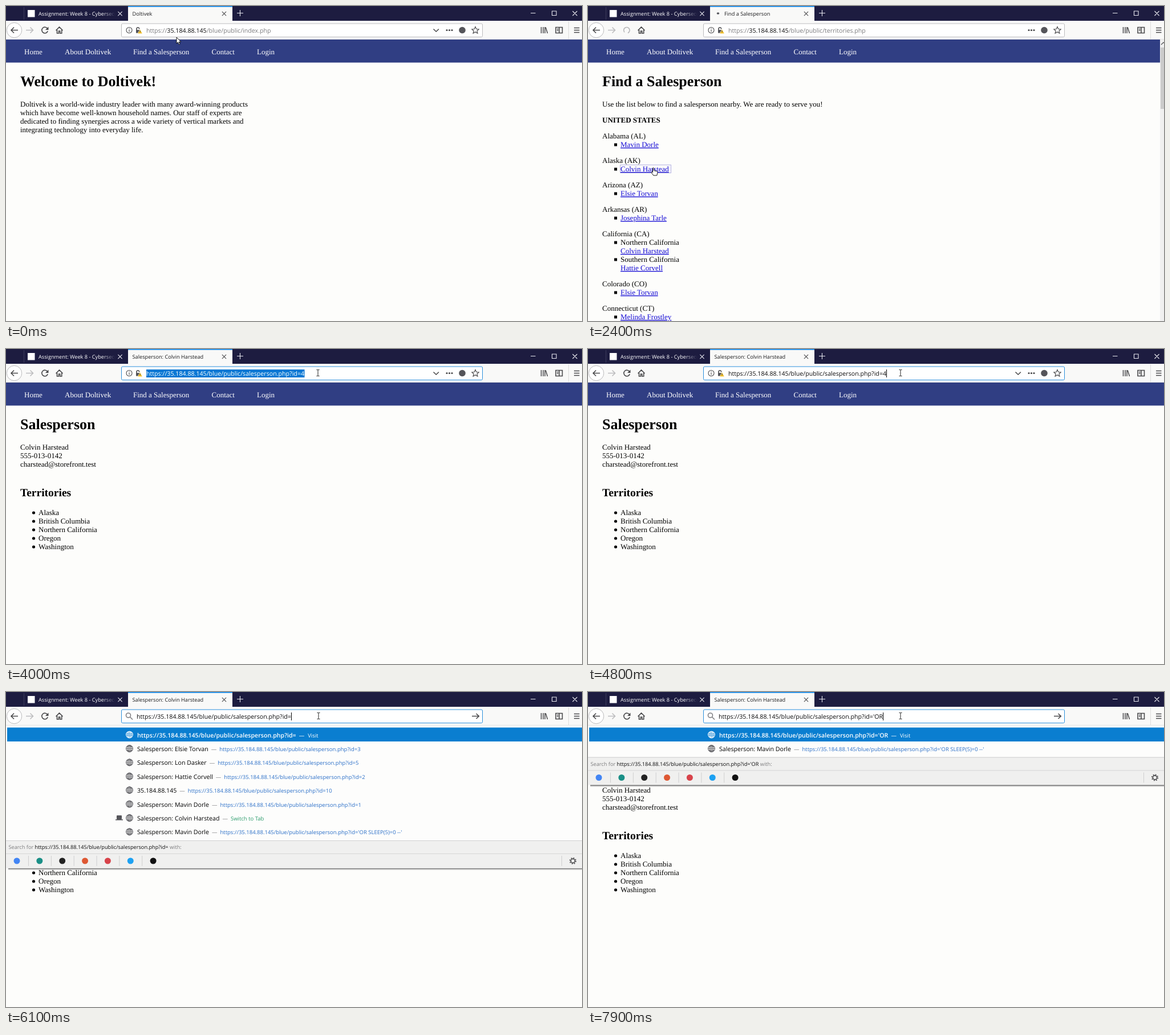
Animation, 1010 px wide and 554 px high, one loop 8 s. Source, as an HTML page:

```html
<!DOCTYPE html>
<html lang="en">
<head>
<meta charset="utf-8">
<title>Browser session</title>
<style>
  html, body { margin: 0; width: 100%; height: 100%; overflow: hidden; background: #fdfdfb; }
  svg { display: block; width: 1010px; height: 554px; }
  text { white-space: pre; }
  .page { font: 13px "Liberation Serif", serif; text-rendering: geometricPrecision; }
  .h1 { font-size: 26px; font-weight: bold; }
  .h2 { font-size: 19.5px; font-weight: bold; }
  .bold { font-weight: bold; }
  .link { fill: #1208d4; text-decoration: underline; }
  .ui { font: 9.2px "Open Sans", "Noto Sans", sans-serif; text-rendering: geometricPrecision; }
  .url { font-size: 10.65px; }
  .small { font-size: 9.5px; }
  .line { fill: none; stroke: #4a4a4c; stroke-width: 1.6; }
  .white { stroke: #e8e8ef; stroke-width: 1.1; }
  .thin { stroke-width: 1.1; }
</style>
</head>
<body>
<svg viewBox="0 0 1010 554" id="stage"></svg>
<script>
const LOOP = 8000, STEP = 100;
const BASE = "https://35.184.88.145/blue/public/";
const QUERY = BASE + "salesperson.php?id=";
const PEOPLE = {
  burke: "Mavin Dorle", main: "Colvin Harstead", irene: "Elsie Torvan", olson: "Josephina Tarle",
  sherry: "Hattie Corvell", barbara: "Melinda Frostley", ken: "Lon Dasker"
};
const COMPANY = "Doltivek";

const text = (x, y, body, cls = "", fill = "#000") =>
  `<text x="${x}" y="${y}" class="${cls}" fill="${fill}">${body}</text>`;
const link = (x, y, body) => `<text x="${x}" y="${y}" class="link">${body}</text>`;
const rect = (x, y, w, h, fill, more = "") =>
  `<rect x="${x}" y="${y}" width="${w}" height="${h}" fill="${fill}" ${more}/>`;
const line = (d, cls = "", more = "") => `<path d="${d}" class="line ${cls}" ${more}/>`;
const dot = (x, y, r, fill) => `<circle cx="${x}" cy="${y}" r="${r}" fill="${fill}"/>`;
const group = (id, body, more = "") => `<g id="${id}" ${more}>${body}</g>`;
const cross = (x, y, r, cls, more) =>
  line(`M${x - r} ${y - r}l${2 * r} ${2 * r}m0 ${-2 * r}l${-2 * r} ${2 * r}`, cls, more);
const globe = (y, color) => `<g transform="translate(216.5 ${y})" fill="none" stroke="${color}" stroke-width="1.1">
  <circle r="5.8"/><ellipse rx="2.7" ry="5.8"/><path d="M-5.8 0H5.8M-5 -3H5M-5 3H5M0 -5.8V5.8" stroke-width=".8"/></g>`;

function navBar() {
  const items = [[32, "Home"], [103, "About " + COMPANY], [223, "Find a Salesperson"], [360.5, "Contact"], [440, "Login"]];
  return rect(0, 59, 1010, 40.5, "#303e83") + items.map(([x, s]) => text(x, 85, s, "", "#fff")).join("");
}

function homePage() {
  const lines = [
    COMPANY + " is a world-wide industry leader with many award-winning products",
    "which have become well-known household names. Our staff of experts are",
    "dedicated to finding synergies across a wide variety of vertical markets and",
    "integrating technology into everyday life."
  ];
  return text(25, 141, `Welcome to ${COMPANY}!`, "h1") + lines.map((s, i) => text(25, 177 + 15 * i, s)).join("");
}

function listPage() {
  const square = y => rect(46, y - 6.5, 5, 5, "#000");
  const states = [
    [233, "Alabama (AL)", "burke"], [276, "Alaska (AK)", "main"], [319, "Arizona (AZ)", "irene"],
    [362, "Arkansas (AR)", "olson"], [493, "Colorado (CO)", "irene"], [536, "Connecticut (CT)", "barbara"]
  ];
  const regions = [[420, "Northern California", "main"], [450, "Southern California", "sherry"]];
  return text(25, 141, "Find a Salesperson", "h1")
    + text(25, 177, "Use the list below to find a salesperson nearby. We are ready to serve you!")
    + text(25, 205, "UNITED STATES", "bold")
    + states.map(([y, s, who]) => text(25, y, s) + square(y + 15) + link(57, y + 15, PEOPLE[who])).join("")
    + text(25, 405, "California (CA)")
    + regions.map(([y, s, who]) => square(y) + text(57, y, s) + link(57, y + 15, PEOPLE[who])).join("")
    + group("focus", rect(56.5, 279.5, 89, 14, "none", 'stroke="#6a66c8" stroke-dasharray="1 1"'))
    + rect(1003, 59, 7, 495, "#f0f0f0") + rect(1004, 73, 6, 108, "#cbcbcb")
    + line("M1005 68l4-4 4 4", "thin");
}

function personPage() {
  const lines = [PEOPLE.main, "555-013-0142", "charstead@storefront.test"];
  const places = ["Alaska", "British Columbia", "Northern California", "Oregon", "Washington"];
  return text(25, 141, "Salesperson", "h1")
    + lines.map((s, i) => text(25, 177 + 15 * i, s)).join("")
    + text(25, 259, "Territories", "h2")
    + places.map((s, i) => dot(48.5, 288 + 15 * i, 2.6, "#000") + text(57, 292 + 15 * i, s)).join("");
}

function tabStrip() {
  return rect(0, 0, 1010, 26, "#1d1c40")
    + line("M31.5 2V24", "", 'style="stroke:#3c3b5c;stroke-width:1"')
    + rect(38, 7, 12.5, 12.5, "#fff")
    + `<g mask="url(#fade)">${text(57, 17, "Assignment: Week 8 - Cybersecurity", "", "#fff")}</g>`
    + cross(200, 13.5, 3.6, "white")
    + rect(214, 0, 183, 26, "#f9f9f8")
    + `<g clip-path="url(#tab)"><circle id="burst" cx="228" cy="14" fill="#a9d3fb"/></g>`
    + rect(214, 0, 183, 1.6, "#0a84e8")
    + `<ellipse id="throbber" cy="13" rx="2.3" ry="1.8" fill="#55565c"/>`
    + text(221.5, 17, "", "title", "#1c1c1e").replace("<text", '<text id="title"')
    + cross(382.5, 13.5, 3.6, "thin")
    + line("M405 12.5h11M410.5 7v11", "white")
    + line("M920 12.5h8.5M957.5 9h7.5v7.5h-7.5zM993.5 9l8 8m0-8l-8 8", "white");
}

function toolbar() {
  const rest = line("M749.5 40.5l4.7 4.5 4.7-4.5", "", 'id="chevron"')
    + [773, 777.5, 782].map(x => dot(x, 42.5, 1.6, "#4a4a4c")).join("")
    + dot(800, 42.5, 5.8, "#55555a")
    + line("M823 36.5l1.8 4 4.3.4-3.2 2.9 1 4.2-3.9-2.2-3.9 2.2 1-4.2-3.2-2.9 4.3-.4z", "", 'style="stroke-width:1.2"')
    + `<circle cx="216" cy="42.5" r="5" class="line thin"/>` + line("M216 41.5v4M216 39v1.3", "thin")
    + rect(228, 42, 6.5, 5.5, "#55555a") + line("M229 42v-2.5a2.4 2.4 0 0 1 4.6 0v1")
    + `<path d="M235 41l4 7.5h-8z" fill="#f4c026" stroke="#f9f3df" stroke-width=".6"/>` + line("M235 43.5v2.6", "thin")
    + rect(246, 36, 277.5, 14, "#0a78d4", 'id="highlight"')
    + `<text x="246" y="47" class="url" id="address" fill="#7b7b7e"><tspan>https://</tspan><tspan id="host">35.184.88.145</tspan><tspan id="path"></tspan></text>`;
  const editing = `<circle cx="214.5" cy="41" r="4" class="line" style="stroke:#808084"/>`
    + line("M217.5 44l4.5 4.5", "", 'style="stroke:#808084"')
    + text(229, 47, "", "url", "#0c0c0d").replace("<text", '<text id="typed"')
    + line("M817 42.5h12M824.5 38l4.8 4.5-4.8 4.5");
  return rect(0, 26, 1010, 33, "#f9f9f8") + rect(0, 58, 1010, 1, "#e2e2e2")
    + `<circle cx="14.5" cy="42.5" r="13.2" fill="#fff" stroke="#b9b9bb"/>`
    + line("M21 42.5H9M14 37.5l-5 5 5 5")
    + line("M35 42.5h12M42.5 37.5l5 5-5 5", "", 'style="stroke:#bdbdbf"')
    + group("reload", line("M72.6 39.6A5.3 5.3 0 1 0 73.2 44") + `<path d="M74.5 36.5v5.5h-5.5z" fill="#4a4a4c"/>`)
    + group("spin", line("M64 46.2A5.2 5.2 0 1 1 70 47.4", "", 'style="stroke:#b6b6b8"'))
    + group("stop", cross(68, 42.5, 5, "", 'style="stroke:#a9a9ab"'))
    + line("M87.5 43l6-6 6 6M89.5 42v6h3v-4h2.2v4h3v-6")
    + rect(202.5, 31, 633, 23.5, "#fff", 'id="field" rx="2"')
    + group("resting", rest) + group("editing", editing)
    + `<path id="caret" d="M0 36v14" stroke="#000"/>`
    + line("M938.5 37v11M942 37v11M945 37v11M946.3 37.5l3.2 10.5", "", 'style="stroke-width:1.5"')
    + line("M964 37.5h11.5v10h-11.5zM970 37.5v10M966 40.5h2.5M966 43h2.5")
    + rect(986, 27, 1, 31, "#dcdcdc")
    + line("M996 38.5h9.5M996 42.5h9.5M996 46.5h9.5");
}

function suggestion(i, title, note, color = "#2c70c8") {
  const y = 75.5 + 24.4 * i;
  return globe(y - .5, "#55555a")
    + `<text x="230" y="${y + 4}" class="url">${title}<tspan dx="5" class="small" fill="#8a8a8c">—</tspan><tspan dx="5" class="small" fill="${color}">${note}</tspan></text>`;
}

function dropdown() {
  const person = (i, who, id) => suggestion(i, "Salesperson: " + PEOPLE[who], QUERY + id);
  const injected = "'OR SLEEP(5)=0 --'";
  const all = person(1, "irene", 3) + person(2, "ken", 5) + person(3, "sherry", 2)
    + suggestion(4, "35.184.88.145", QUERY + 10) + person(5, "burke", 1)
    + suggestion(6, "Salesperson: " + PEOPLE.main, "Switch to Tab", "#2c9c6c")
    + rect(194, 217, 9, 7, "#55555a", 'rx="1"') + rect(192, 224, 13, 1.5, "#55555a")
    + person(7, "burke", injected);
  const engines = ["#4285f4", "#1a8f86", "#222222", "#de5833", "#d8434a", "#1da1f2", "#111111"];
  const footer = rect(0, 0, 1010, 49, "#f0f0ef") + rect(0, 0, 1010, 1, "#d0d0d0") + rect(0, 23, 1010, 1, "#d6d6d6")
    + rect(4, 49, 1006, 1.5, "#777") + rect(4, 50.5, 1006, 1.5, "#ccc")
    + `<text x="4.5" y="15" fill="#7c7c7e">Search for <tspan id="search" fill="#0c0c0d"></tspan> with:</text>`
    + engines.map((c, i) => dot(19 + 39.85 * i, 36, 5.5, c)
      + (i < 6 ? rect(39 + 39.85 * i, 27, 1, 18, "#cfcfd0") : "")).join("")
    + rect(974, 27, 1, 18, "#cfcfd0")
    + `<g class="line" transform="translate(994 36)"><circle r="3.6"/><circle r="5.3" stroke-dasharray="2 2.163"/></g>`;
  return rect(0, 59, 1010, 1, "#fdfdfc", 'id="sheet"')
    + `<g clip-path="url(#rows)">` + rect(2, 62.5, 1008, 24.5, "#0a7ed0") + globe(75, "#fff")
    + `<text x="230" y="79.5" class="url" fill="#fff"><tspan id="visit" font-weight="600"></tspan><tspan dx="5" class="small">—</tspan><tspan dx="6" class="small">Visit</tspan></text>`
    + group("all", all) + group("few", person(1, "burke", injected)) + "</g>"
    + group("footer", footer);
}

// Each pointer's origin is its hot spot.
const POINTERS = {
  arrow: '<path d="M0 0v11l2.5-2.3 1.9 4 1.8-.8-1.9-3.9h3.5z" fill="#fff" stroke="#000" stroke-width=".9"/>',
  hand: '<path d="M-1 .5c0-1.4 2-1.4 2 0v4l5 1.1c1.5.4 1.7 1.4 1.3 3l-1 4.4h-6l-3.6-5c-.6-1.2.8-1.9 1.6-1l.7.8z" fill="#fff" stroke="#000" stroke-width=".9"/>',
  beam: '<path d="M-2.5-5.5H-.5L0-5l.5-.5h2M0-5V5M-2.5 5.5H-.5L0 5l.5.5h2" fill="none" stroke="#222"/>'
};

document.getElementById("stage").innerHTML = `<defs>
  <linearGradient id="ramp"><stop offset=".84" stop-color="#fff"/><stop offset="1" stop-color="#000"/></linearGradient>
  <mask id="fade" maskUnits="userSpaceOnUse" x="50" y="0" width="142" height="26">${rect(50, 0, 142, 26, "url(#ramp)")}</mask>
  <clipPath id="tab">${rect(214, 0, 183, 26, "#000")}</clipPath>
  <clipPath id="rows">${rect(0, 59, 1010, 1, "#000", 'id="rowClip"')}</clipPath></defs>`
  + rect(0, 0, 1010, 554, "#fdfdfb")
  + group("pages", navBar() + group("home", homePage()) + group("list", listPage()) + group("person", personPage()), 'class="page"')
  + group("chrome", tabStrip() + toolbar() + group("dropdown", dropdown()), 'class="ui"')
  + Object.entries(POINTERS).map(([id, body]) => group(id, body)).join("");

const el = {};
document.querySelectorAll("#stage [id]").forEach(node => el[node.id] = node);
const show = (id, on) => { el[id].style.display = on ? "" : "none"; };
const set = (id, attrs) => { for (const k in attrs) el[id].setAttribute(k, attrs[k]); };
const write = (id, s) => { if (el[id].textContent !== s) el[id].textContent = s; };
const within = (t, a, b) => t >= a && t < b;

// Last entry of [time, value] pairs already reached.
const latest = (t, keys) => keys.filter(k => k[0] <= t).pop();

const PATH = [[0, 299, 55], [100, 299, 55], [600, 285.5, 87.5], [1300, 285.5, 87.5], [2000, 114.5, 285],
  [2900, 114.5, 285], [3600, 547, 42], [4100, 547, 42], [4500, 548, 42], [LOOP, 548, 42]];
const SHAPES = [[0, "arrow"], [400, "hand"], [1400, "arrow"], [2000, "hand"], [2900, "arrow"], [3600, "beam"]];
const PAGES = [[0, "home", COMPANY, "index.php"],
  [1000, "list", "Find a Salesperson", "territories.php"],
  [2800, "person", "Salesperson: " + PEOPLE.main, "salesperson.php?id=4"]];
const KEYS = [[0, ""], [5000, ""], [6700, "'"], [7300, "'O"], [7600, "'OR"]];
const SHEET = [[0, 180], [5100, 224], [5200, 252], [5300, 261], [6800, 114.5]];

function pointerAt(t) {
  const i = PATH.findIndex(p => p[0] > t);
  const [t0, x0, y0] = PATH[i - 1], [t1, x1, y1] = PATH[i];
  const u = (t - t0) / (t1 - t0), e = u * u * (3 - 2 * u);
  return `translate(${x0 + (x1 - x0) * e} ${y0 + (y1 - y0) * e})`;
}

function drawPage(t) {
  const [since, page, title, file] = latest(t, PAGES);
  for (const [, id] of PAGES) show(id, id === page);
  show("focus", t >= 2200);

  const loading = within(t, 700, 1000) || within(t, 2300, 2800);
  write("title", title);
  set("title", { x: loading ? 239 : 221.5 });
  show("throbber", loading);
  set("throbber", { cx: 228 + 5 * Math.sin((t - 2400) / 160) });

  const age = t - since, bursting = since > 0 && age < 400;
  show("burst", bursting);
  if (bursting) set("burst", { r: 20 + 30 * (age / 100) ** 1.5, opacity: Math.min(1, 1.3 - age / 330) });

  const spinning = within(t, 700, 900) || within(t, 2300, 2500);
  const stopping = within(t, 900, 1400) || within(t, 2500, 3200);
  show("spin", spinning);
  show("stop", stopping);
  show("reload", !spinning && !stopping);
  write("path", "/blue/public/" + file);
}

function drawAddress(t) {
  const focused = t >= 3800, editing = t >= 5000, selected = within(t, 3800, 4600);
  set("field", { stroke: focused ? "#2a8fdc" : "#bcbcbe" });
  show("resting", !editing);
  show("editing", editing);
  show("chevron", t < 300 || t >= 3500);
  show("highlight", selected);
  const ink = selected ? "#fff" : focused ? "#0c0c0d" : "";
  set("address", { fill: ink || "#7b7b7e" });
  set("host", { fill: ink || "#0c0c0d" });

  const [edited, suffix] = latest(t, KEYS);
  const query = QUERY + suffix;
  ["typed", "visit", "search"].forEach(id => write(id, query));
  const lastKey = editing ? edited : 4600;
  show("caret", t >= 4600 && (t - lastKey) % 1000 < 500);
  const caretX = editing ? 229 + el.typed.getComputedTextLength() : 246 + el.address.getComputedTextLength();
  set("caret", { transform: `translate(${caretX + .5} 0)` });

  const bottom = latest(t, SHEET)[1];
  show("dropdown", editing);
  show("all", t < 6800);
  show("few", t >= 6800);
  set("sheet", { height: bottom - 59 });
  set("rowClip", { height: bottom - 62 });
  set("footer", { transform: `translate(0 ${bottom})` });
}

const start = performance.now();
function frame() {
  const t = Math.floor((performance.now() - start) % LOOP / STEP) * STEP;
  drawPage(t);
  drawAddress(t);
  const shape = latest(t, SHAPES)[1];
  for (const id in POINTERS) show(id, id === shape);
  set(shape, { transform: pointerAt(t) });
  requestAnimationFrame(frame);
}
frame();
</script>
</body>
</html>
```
